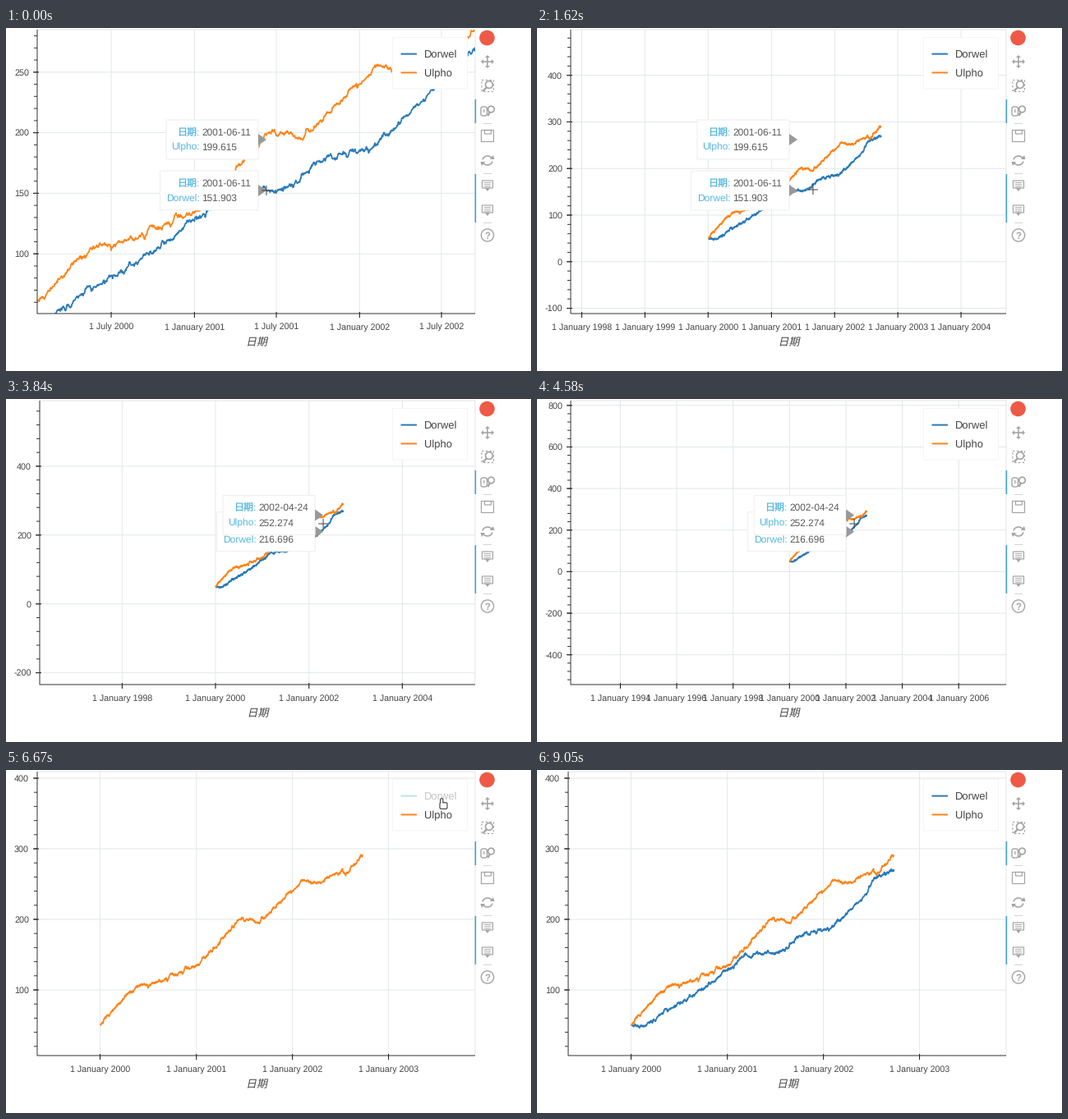
Animation, 639 px wide and 418 px high, one loop 9490 ms. Source, as a matplotlib script:

```python
import numpy as np
import matplotlib.pyplot as plt
from matplotlib.animation import FuncAnimation
from matplotlib.patches import Arc, Circle, FancyBboxPatch, PathPatch, Polygon, Rectangle
from matplotlib.textpath import TextPath
from matplotlib.transforms import Affine2D

W, H = 639, 418
LOOP, TICK, STEPS = 9490, 65, 64
TOP, BOTTOM, RIGHT = 2, 348, 571
BLUE, ORANGE, ICON, ACTIVE = "#2b7bb9", "#ff8519", "#a4a4a4", "#42a0d0"
TEXT, GRID = "#444444", "#e2e8ea"
NAMES = ("Dorwel", "Ulpho")
EPOCH = np.datetime64("2000-01-01")

plt.rcParams["font.family"] = ["Liberation Sans", "Noto Sans CJK JP"]
plt.rcParams["text.hinting"] = "no_hinting"
plt.rcParams["path.snap"] = False

fig = plt.figure(figsize=(W / 72, H / 72), dpi=72, facecolor="white")
ax = fig.add_axes([0, 0, 1, 1])
ax.set_xlim(0, W)
ax.set_ylim(H, 0)
ax.axis("off")

days = np.arange(1000)
HOVERED = (0, 527, 844, 882)


def series(points, seed):
    """Trend through a few points plus a walk that rests on the hovered days."""
    rng = np.random.default_rng(seed)
    noise = np.zeros(days.size)
    for i in days[1:]:
        noise[i] = 0.85 * noise[i - 1] + rng.normal(0, 0.9)
    gap = np.min([np.abs(days - h) for h in HOVERED], axis=0)
    return np.interp(days, *zip(*points)) + noise * np.minimum(1, gap / 6)


first = series([(0, 50), (53, 49), (131, 69), (278, 101), (431, 150), (527, 151.903),
                (587, 156), (640, 178), (756, 187), (844, 216.696), (882, 231.686),
                (924, 258), (999, 270)], 4)
second = series([(0, 50), (59, 77), (144, 105), (212, 110), (378, 137), (506, 190),
                 (527, 199.615), (606, 196.5), (774, 256), (844, 252.274),
                 (882, 262.341), (937, 267), (999, 291)], 9)

# A view is: x of day 0, px per day, y of value 0, px per unit
START = (27.8, .5507, 422.8, 1.476)
HOME = (114.5, .3203, 354, .86)
# first step, last step, centre, factor
ZOOMS = [(2, 6, 317.8, 198.5, .4427), (6, 7, 317.8, 198.5, .869),
         (23, 31, 386, 150.5, .446)]
RESET = 37


def axis_left(view):
    """Long negative labels push the axis to the right."""
    return 41 if (view[2] - BOTTOM) / view[3] < -100 else 38


def view_at(k):
    if k >= RESET:
        return HOME
    x0, sx, y0, sy = START
    for a, b, cx, cy, factor in ZOOMS:
        f = factor ** np.clip((k - a) / (b - a), 0, 1)
        x0, sx, y0, sy = cx + (x0 - cx) * f, sx * f, cy + (y0 - cy) * f, sy * f
    squeeze = (RIGHT - axis_left((x0, sx, y0, sy))) / (RIGHT - 38)
    return RIGHT - (RIGHT - x0) * squeeze, sx * squeeze, y0, sy


# step, x, y of the pointer
PATH = np.array([(8, 317, 198), (11, 336, 197), (16, 316.4, 200), (20, 420, 173),
                 (23, 386.1, 152), (31, 386.1, 152), (36, 586, 163), (38, 586, 163),
                 (41, 532, 41), (57, 532, 41), (60, 606, 380)])


def pointer(k):
    x, y = (np.interp(k, PATH[:, 0], PATH[:, c]) for c in (1, 2))
    if 48 < k < 51:
        y += 20 * np.sin(np.pi * (k - 48) / 3)
    return x, y


def label(x, y, s, size, ha="left", color=TEXT, z=3):
    return ax.text(x, y + .35 * size, s, fontsize=size, ha=ha, va="baseline",
                   color=color, zorder=z)


def stroke(xs, ys, color, lw=1, z=3):
    return ax.plot(xs, ys, color=color, lw=lw, zorder=z, solid_capstyle="butt")[0]


def shape(patch):
    return ax.add_patch(patch)


def fill(points, color=ICON, z=3):
    return shape(Polygon(points, color=color, lw=0, zorder=z))


def outline(x, y, w, h, **kw):
    shape(Rectangle((x, y), w, h, fill=False, ec=ICON, lw=1.2, **kw))


def lens(x, y, r, hx, hy):
    shape(Circle((x, y), r, fill=False, ec=ICON, lw=1.7))
    d = np.hypot(hx - x, hy - y)
    stroke([x + (hx - x) * r / d, hx], [y + (hy - y) * r / d, hy], ICON, 2.3)


def bubble(y):
    outline(579.5, y - 6, 13, 9)
    fill([(583, y + 3), (589, y + 3), (586, y + 7)])
    for dy in (-3.5, -1.2, 1.1):
        stroke([582, 590], [y + dy] * 2, ICON, .9)


def toolbar():
    shape(Circle((585.5, 12), 9.3, color="#ee5a45", lw=0))
    for turn in range(4):
        arrow = np.array([(0, -.8), (5, -.8), (5, -3), (8, 0), (5, 3), (5, .8), (0, .8)])
        fill(Affine2D().rotate_deg(90 * turn).translate(586, 41).transform(arrow))
    outline(579, 63.5, 14.5, 14, ls=(0, (2, 2)))
    lens(588, 69, 4.4, 580.5, 77)
    shape(FancyBboxPatch((580.5, 98.5), 2.5, 6, boxstyle="round,pad=2.5",
                         fill=False, ec=ICON, lw=1.4))
    stroke([581.8, 581.8], [99, 103], ICON, 1.3)
    lens(590.5, 99, 3.8, 586.5, 107)
    outline(578.5, 124.5, 15, 14)
    outline(582.5, 124.5, 8, 4.5)
    for side in (1, -1):
        shape(Arc((586, 161.5), 12, 11, theta1=100 + 90 * side, theta2=240 + 90 * side,
                  ec=ICON, lw=1.6))
        fill([(586 + side * dx, 161.5 - side * dy) for dx, dy in
              ((3, 1.5), (8.5, 1.5), (7, 6.5))])
    bubble(192)
    bubble(222)
    shape(Circle((586, 252.5), 7.6, fill=False, ec=ICON, lw=1.4))
    ax.text(586, 256.6, "?", fontsize=11.5, ha="center", weight="bold", color=ICON)
    for y in (116.5, 177.5, 237.5):
        stroke([581, 591], [y, y], "#d4d4d4")
    for y0, y1 in ((87, 116), (178, 237)):
        stroke([571.4] * 2, [y0, y1], ACTIVE, 1.6, 4)


toolbar()
axis_name = TextPath((0, 0), "日期", size=13, prop={"family": "Noto Sans CJK JP"})


def draw_axes(view):
    x0, sx, y0, sy = view
    low, high = (y0 - BOTTOM) / sy, (y0 - TOP) / sy
    left = axis_left(view)

    step = min((m * p for p in (10, 100) for m in (1, 2, 5)),
               key=lambda s: abs(6 - (high - low) / s))
    major = np.arange(np.ceil(low / step), high / step) * step
    minor = np.arange(np.ceil(low / step * 5), high / step * 5) * step / 5
    ym, yn = y0 - major * sy, y0 - minor * sy
    out = [ax.hlines(ym, left, RIGHT, color=GRID, lw=1, zorder=1),
           ax.hlines(ym, left - 5, left + 2, color="#222222", lw=1.1, zorder=3),
           ax.hlines(yn, left - 4, left, color="#333333", lw=1, zorder=3)]
    out += [label(left - 10, y, f"{v:.0f}", 10.7, "right") for v, y in zip(major, ym)]

    years = (RIGHT - left) / sx / 365.25
    gap = min((.5, 1, 2, 5), key=lambda g: abs(6 - years / g))
    xs = []
    for year in np.arange(1990, 2012, gap):
        month, number = ("July", 7) if year % 1 else ("January", 1)
        date = np.datetime64(f"{int(year)}-{number:02}-01")
        x = x0 + sx * (date - EPOCH).astype(int)
        if left <= x <= RIGHT:
            xs.append(x)
            out.append(label(x, 363.8, f"1 {month} {int(year)}", 10.6, "center"))
    out += [ax.vlines(xs, TOP, BOTTOM, color=GRID, lw=1, zorder=1),
            ax.vlines(xs, BOTTOM - 2, BOTTOM + 5, color="#222222", lw=1.1, zorder=3),
            stroke([left, RIGHT, RIGHT], [TOP, TOP, BOTTOM], "#e5e5e5", z=1),
            stroke([left, left, RIGHT], [TOP, BOTTOM, BOTTOM], "#333333")]
    slant = Affine2D().skew_deg(12, 0).scale(1, -1)
    slant = slant.translate((left + RIGHT) / 2 - 12.5, 386.8)
    out.append(shape(PathPatch(slant.transform_path(axis_name), fc=TEXT, lw=0)))
    return out


def draw_lines(view, muted):
    x0, sx, y0, sy = view
    left = axis_left(view)
    clip = Rectangle((left, TOP), RIGHT - left, BOTTOM - TOP, transform=ax.transData)
    out = []
    for values, color in ((first, BLUE), (second, ORANGE)):
        if muted and color == BLUE:
            continue
        line = stroke(x0 + sx * days, y0 - sy * values, color, 1.8, 2)
        line.set_clip_path(clip)
        out.append(line)
    return out


def draw_legend(muted):
    out = [shape(Rectangle((470.5, 11.5), 91, 62.5, fc="white", ec="#f5f5f5",
                           lw=1, zorder=4))]
    for y, name, color in ((31.6, NAMES[0], BLUE), (54.4, NAMES[1], ORANGE)):
        dim = muted and color == BLUE
        out.append(stroke([480.5, 500], [y, y], "#bfe0ea" if dim else color, 2, 5))
        out.append(label(509, y, name, 13, color="#c4c4c4" if dim else TEXT, z=5))
    return out


def tooltip(x, y, name, date, value, width, z):
    out = [shape(Rectangle((x - width, y - 24), width - 10, 48, fc="white",
                           ec="#efefef", lw=1, zorder=z)),
           fill([(x - 10, y - 7), (x, y), (x - 10, y + 7)], "#999999", z)]
    for dy, key, text in ((-9.5, "日期:", date), (8.7, f"{name}:", f"{value:.3f}")):
        out.append(label(x - 81.5, y + dy, key, 12, "right", "#55b7e0", z))
        out.append(label(x - 78.7, y + dy, text, 11.9, color="#5a5a5a", z=z))
    return out


def draw_tooltips(k):
    if k > 38:
        return []
    if k < 12:
        day, x, ys = 527, 317, (198, 136)
    else:
        # the tips trail the pointer by one step and freeze while zooming
        x0, sx, y0, sy = view_at(12)
        x = pointer(min(k, 24) - 1)[0]
        day = int(np.clip(round((x - x0) / sx), 0, 999))
        ys = [y0 - sy * v[day] for v in (first, second)]
    date = str(EPOCH + day)
    return (tooltip(x, ys[0], NAMES[0], date, first[day], 129.5, 6)
            + tooltip(x, ys[1], NAMES[1], date, second[day], 122, 7))


def draw_pointer(k):
    if k > 60:
        return []
    x, y = pointer(k)
    if x > RIGHT or (x > 470 and y < 75):
        # pointing hand: dark finger and palm under smaller white ones
        return [shape(FancyBboxPatch((x + dx, y + dy), w, h, fc=color, lw=0, zorder=9,
                                     boxstyle=f"round,pad={pad}"))
                for color, pad in (("#222222", 2), ("white", 1))
                for dx, dy, w, h in ((-1.8, -4.8, .2, 8), (-2.5, .3, 6, 4.5))]
    return [stroke([x - 6, x + 6], [y, y], "#444444", 1, 9),
            stroke([x, x], [y - 6, y + 6], "#444444", 1, 9)]


live = []


def update(i):
    for artist in live:
        artist.remove()
    k = min(int((i * TICK + TICK + 16) * STEPS / LOOP), STEPS - 1)
    view = view_at(k)
    muted = 45 <= k < 55
    live[:] = (draw_axes(view) + draw_lines(view, muted) + draw_legend(muted)
               + draw_tooltips(k) + draw_pointer(k))
    return live


anim = FuncAnimation(fig, update, frames=LOOP // TICK, interval=TICK,
                     repeat=True, repeat_delay=0, blit=False)
plt.show()
```
